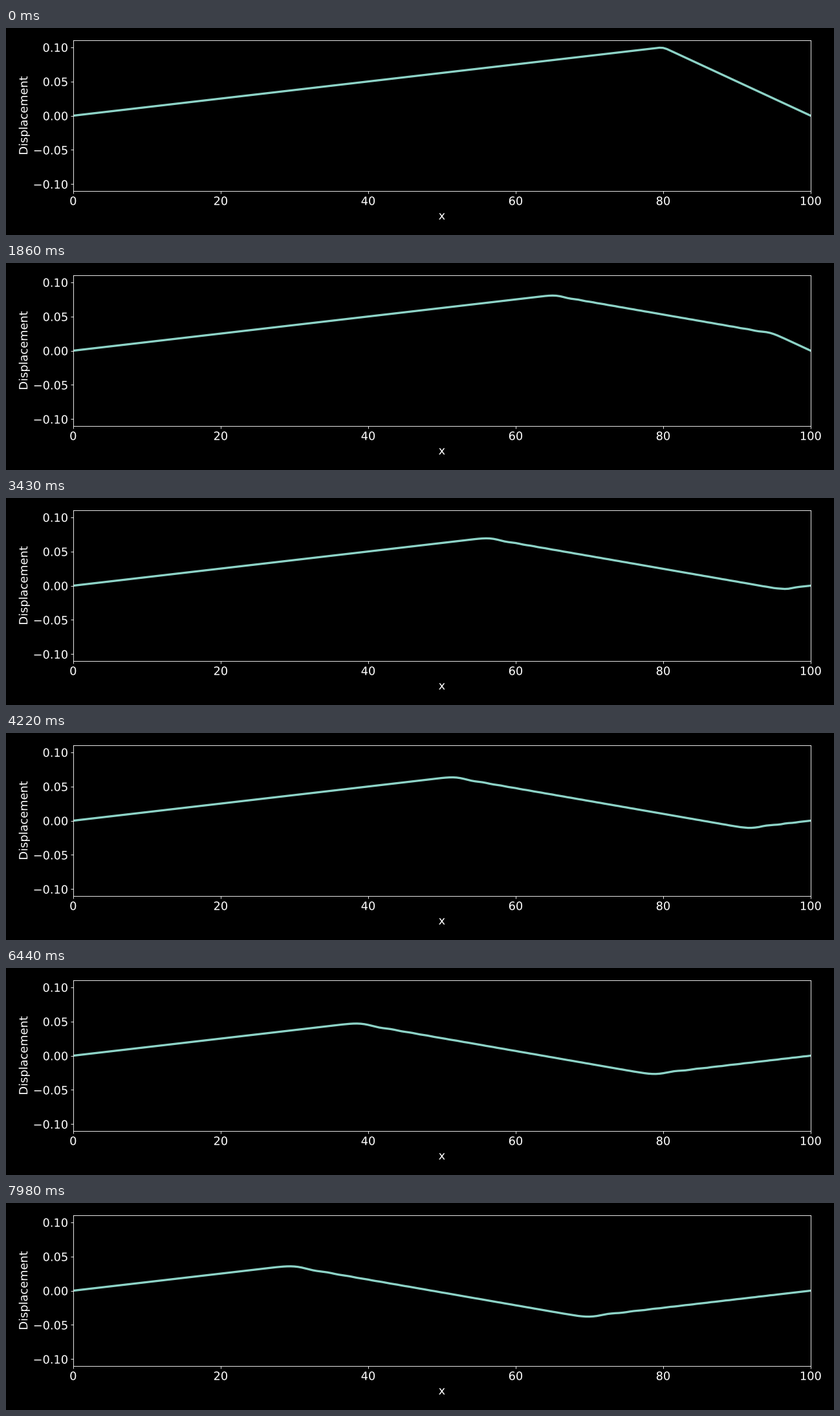
A matplotlib script for the animation above (8 s loop, 1280 px wide and 320 px high).

```python
import numpy as np
import matplotlib.pyplot as plt
from matplotlib.animation import FuncAnimation
from matplotlib.patheffects import Normal

LOOP_MS = 8000
STEP_MS = 20
LENGTH = 100.0
PLUCK_X, PLUCK_H = 80.0, 0.1
DX = 0.5
HOP = 0.2            # distance a wave travels in one solver step

# Distance travelled by the wave at a given time: a quick start, then steady
TIMES = [0, 840, 2650, 8000]
TRAVEL = [0.4, 9.3, 19.6, 50.95]


def solve(x, steps):
    """Leapfrog solution of the plucked string with fixed ends."""
    r = (HOP / DX) ** 2
    u = np.zeros((steps, x.size))
    u[0] = np.interp(x, [0, PLUCK_X, LENGTH], [0, PLUCK_H, 0])
    for n in range(steps - 1):
        bend = r * np.diff(u[n], 2)
        if n == 0:
            u[1, 1:-1] = u[0, 1:-1] + bend / 2
        else:
            u[n + 1, 1:-1] = 2 * u[n, 1:-1] - u[n - 1, 1:-1] + bend
    return u


x = np.linspace(0, LENGTH, int(LENGTH / DX) + 1)
states = solve(x, int(TRAVEL[-1] / HOP) + 3)


def shape(ms):
    pos = np.interp(ms, TIMES, TRAVEL) / HOP
    k = int(pos)
    f = pos - k
    return (1 - f) * states[k] + f * states[k + 1]


plt.style.use("dark_background")
plt.rcParams.update({"font.family": "DejaVu Sans", "font.size": 16})

fig, ax = plt.subplots(figsize=(16, 4), dpi=80)
line, = ax.plot(x, shape(0), lw=3, color="#8dd3c7")
ax.set(xlim=(0, LENGTH), ylim=(-0.11, 0.11),
       xlabel="x", ylabel="Displacement")
ax.set_xticks(np.arange(0, 101, 20))
ax.set_yticks(np.linspace(-0.1, 0.1, 5))
fig.tight_layout()
fig.subplots_adjust(bottom=0.213)

# Drawn as outlines, text keeps its fractional pixel position
for text in [ax.xaxis.label, ax.yaxis.label,
             *ax.get_xticklabels(), *ax.get_yticklabels()]:
    text.set_path_effects([Normal()])


def update(i):
    line.set_ydata(shape(i * STEP_MS))
    return line,


anim = FuncAnimation(fig, update, frames=LOOP_MS // STEP_MS,
                     interval=STEP_MS, repeat=True, repeat_delay=0)
plt.show()
```
